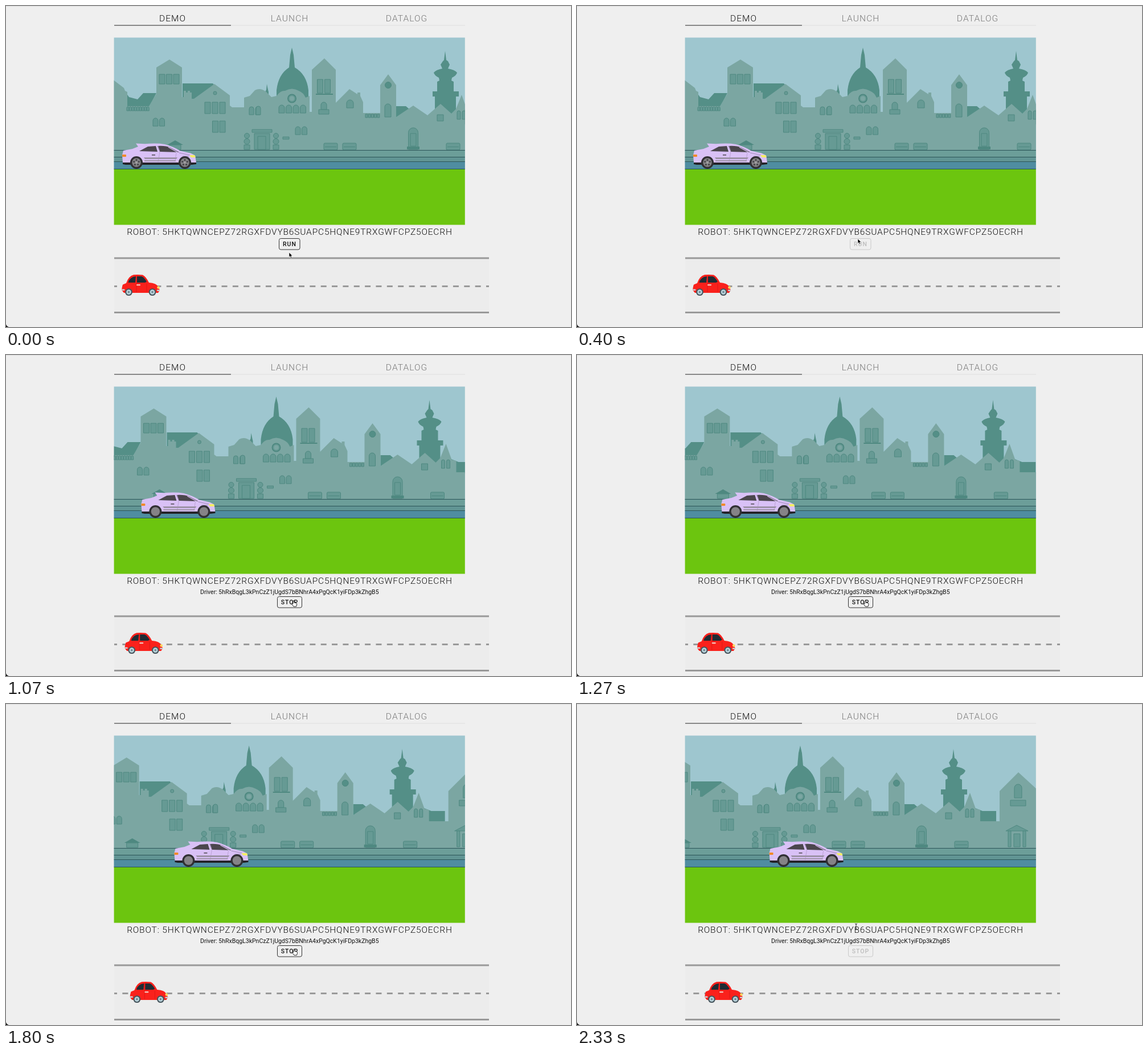
Animation, 992 px wide and 564 px high, one loop 2.39 s. Source, as an HTML page with a canvas:

```html
<!DOCTYPE html>
<html lang="en">
<head>
<meta charset="utf-8">
<title>Robot demo</title>
<style>
html, body { margin: 0; width: 100%; height: 100%; overflow: hidden; background: #efefef; }
canvas { display: block; }
</style>
</head>
<body>
<canvas id="stage" width="992" height="564"></canvas>
<script>
const ctx = document.getElementById('stage').getContext('2d');
const LOOP = 2390, START = 650, RUNNING = 600;
const ROBOT = '5HKTQWNCEPZ72RGXFDVYB6SUAPC5HQNE9TRXGWFCPZ5OECRH';
const DRIVER = '5hRxBqgL3kPnCzZ1jUgdS7bBNhrA4xPgQcK1yiFDp3kZhgB5';

// The picture steps at about 15 per second, with a few early ticks.
const early = { 11: 30, 23: 30, 31: 40 };
const ticks = Array.from({ length: 36 }, (_, k) => Math.round(k * 20 / 3) * 10 - (early[k] || 0));

const LIGHT = '#7ba6a2', DARK = '#548f87', GLASS = '#669a94', EDGE = '#4e8880';

function rect(x, y, w, h, color) {
  ctx.fillStyle = color;
  ctx.fillRect(x, y, w, h);
}

function shape(d, fill, stroke, width = 1) {
  const p = new Path2D(d);
  if (fill) { ctx.fillStyle = fill; ctx.fill(p); }
  if (stroke) { ctx.strokeStyle = stroke; ctx.lineWidth = width; ctx.stroke(p); }
}

function disc(x, y, r, fill, stroke, width = 1) {
  ctx.beginPath();
  ctx.arc(x, y, r, 0, 7);
  if (fill) { ctx.fillStyle = fill; ctx.fill(); }
  if (stroke) { ctx.strokeStyle = stroke; ctx.lineWidth = width; ctx.stroke(); }
}

function round(x, y, w, h, r, fill, stroke) {
  ctx.beginPath();
  ctx.roundRect(x, y, w, h, r);
  if (fill) { ctx.fillStyle = fill; ctx.fill(); }
  if (stroke) { ctx.strokeStyle = stroke; ctx.lineWidth = 1; ctx.stroke(); }
}

function text(str, x, y, font, color, spacing = 0) {
  ctx.font = font;
  ctx.letterSpacing = spacing + 'px';
  ctx.textAlign = 'center';
  ctx.fillStyle = color;
  ctx.fillText(str, x + spacing / 2, y);
}

// A row of equal windows, optionally with round tops.
function windows(x, y, w, h, count, step, arched) {
  for (let i = 0; i < count; i++) {
    const r = arched ? [w / 2, w / 2, 0, 0] : 0;
    round(x + i * step, y, w, h, r, GLASS, EDGE);
  }
}

function skyline() {
  // Far layer: roofs, dome and pagoda
  shape('M204 143L216 160 231 164 241 153H264L251 178H204ZM310 136H363L368 141V170H310Z', DARK);
  shape('M685 176H702L708 181V198H685ZM802 180L822 188H846V208H802Z', DARK);
  shape('M455 165V151L457 147 458 137 460 147 461 151V165Z', DARK);
  shape('M475 162V148Q478 120 497 108L499 86 502 73 505 86 507 108Q528 120 531 148V162Z', DARK);
  shape('M771 79L773 95 776 97 779 103 776 110Q788 112 792 117 791 122 783 126L782 131 786 133' +
    'V150H795V159H790V200H753V159H749V150H757V133L761 131 760 126Q752 122 751 117 755 112 766 110' +
    'L763 103 767 97 769 95Z', DARK);

  // Near layer: one long row of facades
  shape('M140 253V168L186 128 207 144 209 149 213 151V176H251L264 154V108L287 94 309 108V160H312V149H316V152' +
    'H319V149H323V152H326V163H330L366 137 393 157V175L397 178H418V161L428 158 437 148' +
    'Q447 143 457 151L466 160 475 158Q482 148 490 149 502 142 514 149 522 152 526 161L533 158' +
    'V186H537V112L559 92 579 112V170L603 146 617 155V152H622V158L627 169V188H657V139L671 120' +
    ' 685 139V195L715 175 740 192 763 172 782 189 790 181 800 156 810 184 818 186V206H852V153' +
    'L885 120 920 152V253Z', LIGHT);

  windows(269, 120, 10, 17, 3, 12.5);
  windows(212, 177, 4, 7, 9, 4.4, true);
  windows(258, 197, 9, 14, 2, 11.5, true);
  windows(349, 169, 10, 20, 3, 13);
  windows(362.5, 202, 10, 20, 2, 12.5);
  disc(367, 153, 3, GLASS, EDGE);
  windows(427, 177, 8, 14, 2, 11, true);
  windows(439, 176, 8, 15, 1, 0, true);
  windows(479, 174, 10, 14, 4, 12.5, true);
  disc(502, 162.5, 7, GLASS, EDGE, 2);
  disc(502, 162.5, 4, LIGHT);
  windows(546.5, 129, 10, 24, 2, 13);
  rect(544, 154, 30, 2, EDGE);
  windows(553, 169, 10, 13, 1, 0, true);
  windows(549, 182, 18, 8, 1, 0);
  windows(508, 212, 9, 14, 2, 11.5, true);
  windows(486, 230, 11, 4, 1, 0);
  windows(598, 165, 12, 14, 1, 0, true);
  windows(631, 190, 4, 6, 5, 5.2);
  disc(671, 139, 5.5, DARK, EDGE);
  windows(665, 172, 11, 23, 1, 0, true);
  windows(757, 191, 11, 11, 1, 0);
  windows(792, 184, 6, 15, 2, 9, true);
  windows(878, 141, 13, 24, 1, 0, true);
  windows(871, 169, 27, 10, 1, 0);

  // Portal with topiary
  windows(436, 224, 27, 28, 1, 0);
  windows(442, 229, 14, 23, 1, 0);
  windows(432, 217, 35, 5, 1, 0);
  for (const x of [423, 474]) {
    disc(x, 228, 4.5, GLASS, EDGE);
    disc(x, 238, 5, GLASS, EDGE);
    windows(x - 5, 244, 10, 8, 1, 0);
  }
  for (const x of [558, 591, 773]) {
    round(x, 241, 24, 12, 2, GLASS, EDGE);
    rect(x + 2, 247, 20, 1, EDGE);
  }
  windows(706.5, 214, 17, 38, 1, 0, true);
  windows(710, 224, 10, 22, 1, 0);
  rect(704, 247, 22, 5, EDGE);
  shape('M283 244L297 236 311 244Z', EDGE);
  windows(287, 244, 20, 8, 1, 0);
  shape('M863 223L882 213 902 223Z', GLASS, EDGE);
  windows(867, 223, 5, 28, 2, 26);
  windows(877, 228, 11, 23, 1, 0);
}

function scene(moved) {
  ctx.save();
  ctx.beginPath();
  ctx.rect(189.6, 55.4, 616.2, 329);
  ctx.clip();
  rect(189, 55, 618, 232, '#9ec6cf');
  ctx.save();
  ctx.translate(-0.0655 * moved, 0);
  skyline();
  ctx.restore();
  rect(189, 253, 618, 12, '#6c9e99');
  rect(189, 265, 618, 8, '#619594');
  rect(189, 273, 618, 14, '#4f8da1');
  for (const y of [253, 265, 273, 286]) rect(189, y, 618, 1, '#2c5558');
  rect(189, 287, 618, 98, '#6cc50f');
  purpleCar(0.0795 * moved, moved > 0);
  ctx.restore();
}

function purpleCar(dx, spinning) {
  ctx.save();
  ctx.translate(dx, 0);
  shape('M205 274H334V278L326 279H210L205 278Z', '#252329');
  shape('M204 262L206 254 222 251 232 247 228 241.5 244 242.3Q265 240.5 279 243 294 247 306 254.5' +
    'L324 258.5 332 262.5 334 275H205Z', '#d9c1f6');
  shape('M234 255L249 247 263 246 266 256Z', '#4b464d');
  shape('M266 246Q280 245 289 249L304 257 270 256Z', '#4b464d');
  shape('M285 248L301 257', null, '#d9c1f6', 1.2);
  shape('M267 246L270 256 267 274M299 258L297 272', null, '#b49bcd', 0.8);
  shape('M242 266H301L299 269H244ZM243 271H298V273H243Z', '#9e93a8');
  shape('M304 258L323 262M310 264H321', null, '#8f7ba8', 0.8);
  rect(256, 261, 6, 1.5, '#4b464d');
  round(204, 261, 7, 4, 1, '#f18a28');
  shape('M322 262L331 262 333 266 325 266Z', '#f4ef63');
  for (const x of [229, 314]) {
    disc(x, 275, 11, '#302f33');
    disc(x, 275, 7.7, '#858387');
    if (spinning) continue;
    for (let i = 0; i < 5; i++) {
      const a = i * Math.PI * 0.4 - Math.PI / 2;
      disc(x + 4.5 * Math.cos(a), 275 + 4.5 * Math.sin(a), 1.7, '#47464a');
    }
    disc(x, 275, 1.6, '#aaa');
  }
  ctx.restore();
}

function redCar(dx) {
  ctx.save();
  ctx.translate(dx, 0.6);
  shape('M203.5 495L205 489 211 486.5Q215 474 224 471.7 232 470.8 240 472 246 475 251 485.5' +
    'Q264 486 267.5 493L270 499 267 503.5H207L203.5 499Z', '#fa211c');
  shape('M214.5 485.5Q217 475.5 228 474.5L227 485.5Z', '#202c34');
  shape('M230 474.5H238Q243 476.5 247 484L244 485.5H230Z', '#202c34');
  shape('M229 474V502M247 487V501', null, '#d11915', 0.7);
  round(229, 488.5, 7, 2.2, 1, '#f5c8bf');
  disc(267.5, 494, 2.3, '#ffd65c');
  round(203.5, 497, 5, 2.5, 1, '#c9d2d6');
  round(265, 498, 5, 2.5, 1, '#c9d2d6');
  for (const x of [215.5, 257]) {
    disc(x, 502, 6.4, '#46555d');
    disc(x, 502, 4.3, '#b8d2da');
    disc(x, 502, 1.8, '#6d858f');
  }
  ctx.restore();
}

function track(moved) {
  const step = 658 / 34;
  rect(190, 444, 658, 93, '#ececec');
  rect(190, 441.5, 658, 3, '#999');
  rect(190, 537, 658, 3, '#999');
  ctx.save();
  ctx.beginPath();
  ctx.rect(190, 480, 658, 24);
  ctx.clip();
  for (let i = 0; i <= 34; i++) rect(185 + i * step, 491, 10, 3, '#999');
  ctx.restore();
  redCar(0.0125 * moved);
}

function button(label, x, y, w, disabled) {
  round(x + 0.5, y + 0.5, w, 19.5, 3, null, disabled ? '#c9c9c9' : '#333');
  text(label, 497.5, y + 14, '500 10.5px Roboto, sans-serif', disabled ? '#bdbdbd' : '#111', 0.95);
}

function popup() {
  ctx.save();
  ctx.shadowColor = 'rgba(0,0,0,.45)';
  ctx.shadowBlur = 34;
  ctx.shadowOffsetY = 12;
  round(332, 77, 331.5, 367, 6, '#f9f9fb');
  ctx.restore();
  const bar = ctx.createLinearGradient(0, 77, 0, 93);
  bar.addColorStop(0, '#e5e3e5');
  bar.addColorStop(1, '#d0ced0');
  round(332, 77, 331.5, 16, [6, 6, 0, 0], bar);
  rect(332, 93, 331.5, 0.7, '#b3b1b3');
  ['#fc5650', '#fdb52c', '#27bf37'].forEach((c, i) => disc(340 + i * 12, 84.7, 3.6, c));
  text('Mozilla Firefox', 497.5, 87.4, '600 7.4px Inter, sans-serif', '#3c3a3c');
}

// time, x, y, pointer kind
const pointerPath = [
  [0, 497, 433, 'arrow'], [130, 498, 421, 'hand'], [200, 498, 419, 'arrow'],
  [330, 497, 417, 'arrow'], [400, 493, 409, 'arrow'], [670, 525, 413, 'beam'],
  [700, 526, 414, 'beam'], [1000, 507, 435, 'hand'], [1070, 505, 436, 'hand'],
  [1500, 508, 436, 'hand'], [1930, 505, 435, 'arrow'], [2130, 505, 434, 'arrow'],
  [2270, 493, 398, 'beam'], [2330, 490, 391, 'beam'], [2390, 490, 391, 'beam']
];

const pointers = {
  arrow: () => shape('M0 0V8.2L1.9 6.5 3.3 9.5 4.7 8.9 3.4 5.9H6Z', '#000', '#fff', 0.6),
  beam: () => shape('M-2 -5Q0 -5 0 -3.5 0 -5 2 -5M0 -4V4M-2 5Q0 5 0 3.5 0 5 2 5', null, '#222', 0.9),
  hand: () => shape('M-1 -4Q0 -5 1 -4V-1L5 0Q6 1 5.5 3L4.5 6H0L-3 2Q-3 0 -1 1Z', '#fff', '#111', 0.9)
};

function pointer(t) {
  const i = pointerPath.findIndex((p, k) => t < pointerPath[k + 1][0]);
  const [t0, x0, y0, kind] = pointerPath[i];
  const [t1, x1, y1] = pointerPath[i + 1];
  const u = (t - t0) / (t1 - t0);
  ctx.save();
  ctx.translate(x0 + (x1 - x0) * u, y0 + (y1 - y0) * u);
  pointers[kind]();
  ctx.restore();
}

function draw(t) {
  const moved = Math.max(0, t - START);
  const running = t >= RUNNING;
  const label = '300 15.5px Roboto, sans-serif';
  rect(0, 0, 992, 564, '#efefef');
  rect(0, 0, 992, 1, '#dedede');
  shape('M0 559Q1 563 5 564H0Z', '#111');

  text('DEMO', 292, 27, label, '#111', 1.1);
  text('LAUNCH', 497.5, 27, label, '#777', 1.1);
  text('DATALOG', 703, 27, label, '#777', 1.1);
  rect(395, 33.5, 411, 1, '#dfdfdf');
  rect(190, 33.5, 205, 1, '#222');

  scene(moved);
  text('ROBOT: ' + ROBOT, 497.5, 402, label, '#111', 0.82);

  if (running) {
    text('Driver: ' + DRIVER, 497.8, 420, '400 10.5px Roboto, sans-serif', '#111');
    button('STOP', 476, 424, 43, t >= 1930);
  } else {
    button('RUN', 479, 408, 36.5, t >= 200);
  }
  ctx.save();
  if (running) ctx.translate(0, 16);
  track(moved);
  ctx.restore();

  if (running && t < 930) round(990, 132, 4, 253, 2, '#777');
  if ((t >= 200 && t < 330) || (t >= 1930 && t < 2200)) popup();
  pointer(t);
}

const origin = performance.now();
function loop() {
  const t = (performance.now() - origin) % LOOP;
  draw(ticks.findLast(start => start <= t));
  requestAnimationFrame(loop);
}
loop();
</script>
</body>
</html>
```
